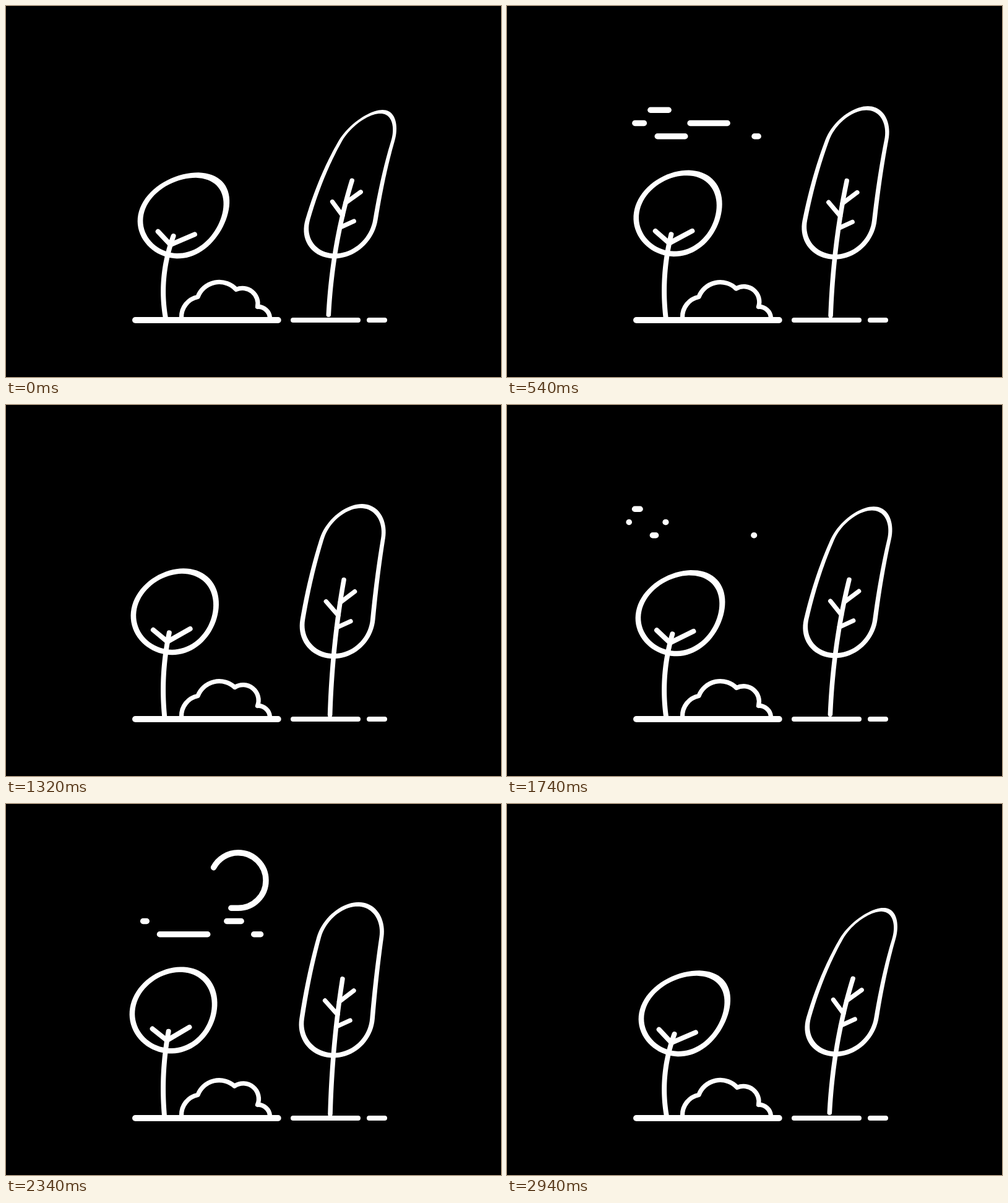
Animation, 800 px wide and 600 px high, one loop 3000 ms. Source, as an HTML page with a canvas:

```html
<!DOCTYPE html>
<html lang="en">
<head>
<meta charset="utf-8">
<title>Windy trees</title>
<style>
  html, body { margin: 0; width: 100%; height: 100%; overflow: hidden; background: #000; }
  canvas { display: block; }
</style>
</head>
<body>
<canvas id="stage" width="800" height="600"></canvas>
<script>
const g = document.getElementById('stage').getContext('2d');
const LOOP = 3000, STEP = 30, GROUND = 504;

const ramp = (t, from, to) => Math.min(1, Math.max(0, (t - from) / (to - from)));
const swing = u => .5 - .5 * Math.cos(Math.PI * u);
const cubic = u => u < .5 ? 4 * u ** 3 : 1 - 4 * (1 - u) ** 3;
const logistic = (t, mid, width) => 1 / (1 + Math.exp((mid - t) / width));

// Turning points of the sway: time and lean.
const SWAY = [[0, 1], [1040, -.11], [1655, .67], [2200, .02], [2970, 1]];

function leanAt(t) {
  let lean = SWAY[0][1];
  for (let i = 1; i < SWAY.length; i++) {
    const [t0, a] = SWAY[i - 1], [t1, b] = SWAY[i];
    lean += (b - a) * swing(ramp(t, t0, t1));
  }
  return lean;
}

// Each tree is straight at rest; bend() maps (offset from axis, height) to the stage.
const tall = {
  base: 7.6, twigWidth: 7.2, ring: 4, r: 59.5, low: 154.5, high: 292, top: 220.5,
  twigs: [[-24.7, 184.5, 161.5], [22.7, 201, 182.5], [22.3, 152, 141.5]],
  bend: (o, h, k) => [
    527 + k * (-3 + .0273 * h + .000286 * h * h) + o * (1 - k * 1.77e-6 * h * h),
    GROUND - h + k * (12 * (h / 350) ** 4 - 2.5)
  ]
};
const round = {
  base: 8, twigWidth: 8, ring: 4.4, r: 67.5, low: 176.5, high: 176.5, top: 141,
  twigs: [[-27.4, 141.7, 126], [33, 152.6, 126]],
  bend: (o, h, k) => [
    254 + k * (2 - .085 * h + .00094 * h * h) + o * (1 - .045 * k),
    GROUND - h + k * (.034 * h + .13 * o)
  ]
};

function stroke(width, path) {
  g.lineWidth = width;
  path ? g.stroke(path) : g.stroke();
}

function polyline(points, width) {
  g.beginPath();
  for (const p of points) g.lineTo(...p);
  stroke(width);
}

function capsule(r, low, high, place) {
  const N = 40;
  for (const [side, mid, next] of [[1, high, low], [-1, low, high]]) {
    for (let i = 0; i <= N; i++) {
      const q = Math.PI * i / N;
      const p = place(side * r * Math.cos(q), mid + side * r * Math.sin(q));
      if (side === 1 && i === 0) g.moveTo(...p);
      else g.lineTo(...p);
    }
    for (let i = 1; i < N; i++) g.lineTo(...place(-side * r, mid + (next - mid) * i / N));
  }
  g.closePath();
}

function drawTree(tree, k) {
  const place = (o, h) => tree.bend(o, h, k);
  g.beginPath();
  capsule(tree.r + tree.ring, tree.low, tree.high, place);
  capsule(tree.r - tree.ring, tree.low, tree.high, place);
  g.fill('evenodd');

  const trunk = Array.from({ length: 31 }, (_, i) => place(0, tree.top * i / 30));
  polyline(trunk, tree.base);
  for (const [o, tip, joint] of tree.twigs)
    polyline([place(o, tip), place(0, joint)], tree.twigWidth);
}

function drawBush(k) {
  stroke(7.3, new Path2D(`M283.5 504 A33 33 0 0 1 310 470.5
    A37 37 0 0 1 ${369 + 3 * k} ${456 + 2.5 * k}
    A25 25 0 0 1 406.5 486.5 A19 19 0 0 1 426.5 504`));
}

// Wind: progress of tail and head along a path; the second gust follows after gap.
const curl = {
  gap: 1475,
  tail: t => ramp(t, 400, 1235) ** 1.52,
  head: t => .02 * ramp(t, 80, 270) + .98 * logistic(t, 678, 71) * (t > 80)
};
const gust = {
  gap: 1560,
  tail: t => ramp(t, 30, 850) ** 2.3,
  head: t => cubic(ramp(t, 30, 830))
};
const drift = {
  gap: 1560,
  tail: t => .1 * ramp(t, 180, 800) + .9 * ramp(t, 800, 1260) ** 2,
  head: t => ramp(t, 115, 1043) ** 1.216
};

const R = 44.8, SWEEP = 274 * Math.PI / 180;
const WIND = [
  [curl, 206.5, 375.2, 168.3],
  [gust, 196.5, 227.3, 189.5],
  [gust, 253.5, 380.3, 189.5],
  [drift, 235.3, 371, 210.7],
  [drift, 398.8, 418, 210.7]
];

function drawWind([pace, x, end, y], time) {
  const t = time > pace.gap ? time - pace.gap : time;
  const tail = pace.tail(t), head = pace.head(t);
  if (head <= 0 || tail >= 1) return;
  const len = end - x + (pace === curl ? R * SWEEP : 0);
  g.beginPath();
  g.moveTo(x, y);
  g.lineTo(end, y);
  if (pace === curl) g.arc(end, y - R, R, Math.PI / 2, Math.PI / 2 - SWEEP, true);
  g.setLineDash([Math.max(.05, (head - tail) * len), 2000]);
  g.lineDashOffset = -Math.min(tail * len, len - .1);
  stroke(9.4);
  g.setLineDash([]);
}

function draw(t) {
  const lean = leanAt(t), bend = lean + .9;
  g.fillStyle = '#000';
  g.fillRect(0, 0, 800, 600);
  g.fillStyle = g.strokeStyle = '#fff';
  g.lineCap = g.lineJoin = 'round';

  polyline([[209, 508], [439.7, 508]], 10);
  polyline([[464, 508], [569, 508]], 8);
  polyline([[587, 508], [612, 508]], 8);
  drawBush(lean);
  drawTree(round, bend);
  drawTree(tall, bend);
  for (const w of WIND) drawWind(w, t);
}

const begin = performance.now();
function tick() {
  const t = (performance.now() - begin) % LOOP;
  draw(Math.floor(t / STEP) * STEP);
  requestAnimationFrame(tick);
}
tick();
</script>
</body>
</html>
```
